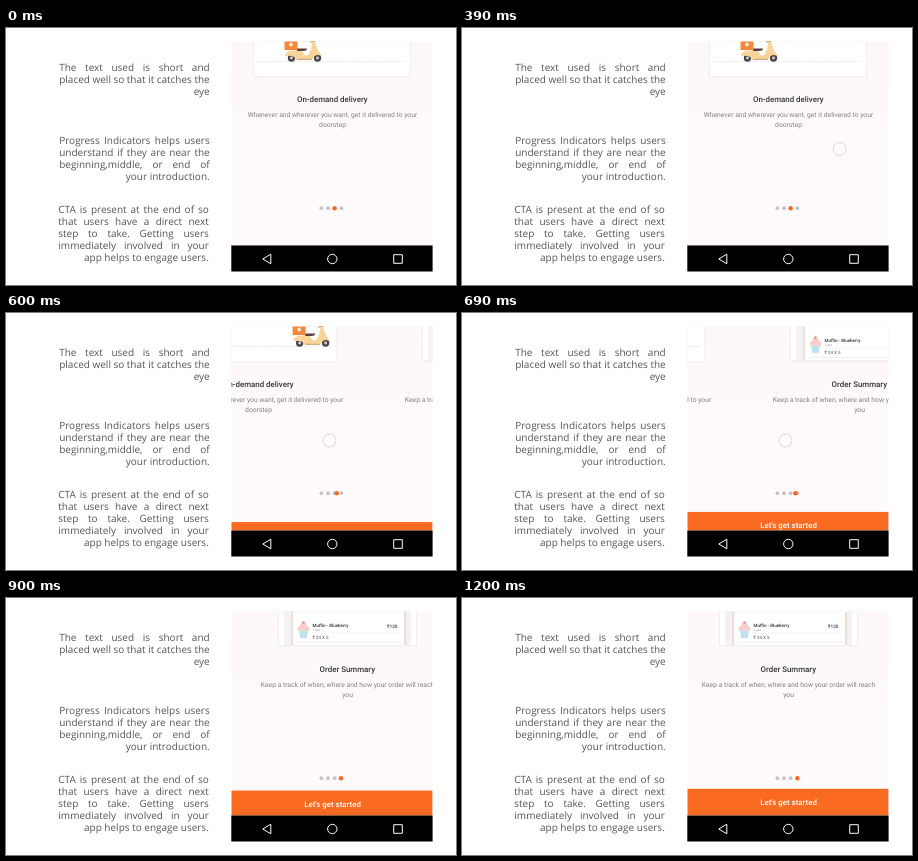
An HTML page with a canvas for the animation above (1560 ms loop, 450 by 257 pixels).

```html
<!DOCTYPE html>
<html lang="en">
<meta charset="utf-8">
<title>Onboarding swipe</title>
<style>
html, body { margin: 0; overflow: hidden; background: #fff; }
canvas { display: block; }
</style>
<canvas id="stage" width="450" height="257"></canvas>
<script>
const ctx = document.getElementById('stage').getContext('2d');
ctx.textRendering = 'geometricPrecision';

const LOOP = 1560, STEP = 30, SPACING = 233;
const ORANGE = '#fb6a21';
const SCREEN = { left: 225.3, top: 13.4, right: 426.6, nav: 217.5, bottom: 243.5 };
SCREEN.width = SCREEN.right - SCREEN.left;

// [ms, value] keys, linear in between
const SCROLL = [[450, 0], [510, 14], [570, 46], [600, 74], [630, 106], [660, 138], [690, 162],
  [720, 171], [810, 194], [900, 218], [990, 231], [1080, 232.3], [1200, SPACING]];
const TOUCH = [[420, 0], [510, 0.35], [600, 1]];
const TOUCH_ALPHA = [[270, 0], [360, 1], [690, 1], [810, 0.5], [900, 0]];

const NOTES = [
  { x: 53.2, y: 43, lines: ['The text used is short and', 'placed well so that it catches the', 'eye'] },
  { x: 53.2, y: 115.5, lines: ['Progress Indicators helps users', 'understand if they are near the',
    'beginning,middle, or end of', 'your introduction.'] },
  { x: 52.3, y: 184.5, lines: ['CTA is present at the end of so', 'that users have a direct next',
    'step to take. Getting users', 'immediately involved in your', 'app helps to engage users.'] }
];

function keyed(keys, t) {
  if (t <= keys[0][0]) return keys[0][1];
  for (let i = 1; i < keys.length; i++) {
    const [t0, v0] = keys[i - 1], [t1, v1] = keys[i];
    if (t <= t1) return v0 + (v1 - v0) * (t - t0) / (t1 - t0);
  }
  return keys[keys.length - 1][1];
}

function rect(x, y, w, h, color) {
  ctx.fillStyle = color;
  ctx.fillRect(x, y, w, h);
}

function disc(x, y, r, color) {
  ctx.fillStyle = color;
  ctx.beginPath();
  ctx.arc(x, y, r, 0, 7);
  ctx.fill();
}

function shape(path, color) {
  ctx.fillStyle = color;
  ctx.fill(new Path2D(path));
}

function line(path, color, width = 0.7) {
  ctx.strokeStyle = color;
  ctx.lineWidth = width;
  ctx.stroke(new Path2D(path));
}

function text(str, x, y, font, color, align = 'left') {
  ctx.font = font;
  ctx.fillStyle = color;
  ctx.textAlign = align;
  ctx.fillText(str, x, y);
}

const roboto = (size, weight = 400) => `${weight} ${size}px Roboto, sans-serif`;

function at(dx, draw) {
  ctx.save();
  ctx.translate(dx, 0);
  draw();
  ctx.restore();
}

function clipped(x, y, w, h, draw) {
  ctx.save();
  ctx.beginPath();
  ctx.rect(x, y, w, h);
  ctx.clip();
  draw();
  ctx.restore();
}

function note({ x, y, lines }) {
  const font = '10px "Open Sans", sans-serif', color = '#555', width = 150.5;
  lines.forEach((str, i) => {
    const base = y + i * 12;
    if (i === lines.length - 1) return text(str, x + width, base, font, color, 'right');
    ctx.font = font;
    const words = str.split(' ');
    const sizes = words.map(w => ctx.measureText(w).width);
    const gap = (width - sizes.reduce((a, b) => a + b)) / (words.length - 1);
    let left = x;
    words.forEach((w, k) => {
      text(w, left, base, font, color);
      left += sizes[k] + gap;
    });
  });
}

function card(x, w, bottom) {
  rect(x - 0.6, 0, w + 1.2, bottom + 0.8, '#e8e4e8');
  rect(x, 0, w, bottom, '#fff');
}

function caption(title, line1, line2) {
  text(title, 326.3, 73.7, roboto(7.9, 500), '#333', 'center');
  text(line1, 326.5, 89.3, roboto(6.75), '#808080', 'center');
  text(line2, 326.5, 98.9, roboto(6.75), '#808080', 'center');
}

function scooter() {
  disc(285.5, 30, 3.7, '#4a4548');
  disc(311.5, 30, 3.7, '#4a4548');
  shape('M279 28Q280 22.5 287 22.5H296Q297 27.5 301 27.5Q305 26 306.5 13H309Q310 21 316 28L312 27Q308 27 306 31.5H290Q289 27 279 28Z', '#f8d49a');
  shape('M291 20.5H301Q301 23 297 23H291Z', '#5a4038');
  rect(278.5, 8, 13, 14, '#f5873a');
  disc(285, 16.5, 2, '#fde6d2');
  line('M304 14L309 13', '#8a5a3c', 1);
  line('M291 31.3H306', '#b98a5a', 0.8);
  disc(285.5, 30, 1.4, '#d8d4d4');
  disc(311.5, 30, 1.4, '#d8d4d4');
}

function deliveryPage(offset) {
  at(-offset, () => {
    card(247.5, 157, 48.5);
    clipped(247.5, 0, 157, 48, () => {
      ctx.setLineDash([2, 1.5]);
      line('M253 33.5H399', '#ddd6d4', 0.6);
      ctx.setLineDash([]);
      at(offset * 1.11, scooter);
    });
    caption('On-demand delivery',
      'Whenever and wherever you want, get it delivered to your', 'doorstep');
  });
}

function summaryPage(offset) {
  at(SPACING - offset, () => {
    card(258, 137, 47.5);
    rect(263, 0, 127, 47, '#f4f1f4');
    rect(270, 0, 115, 47, '#fff');
    rect(270, 0, 2.2, 47, '#f0dfd4');
    rect(383, 0, 2.2, 47, '#f0dfd4');
    line('M276 44.5H380', '#e8e5e8', 0.6);
    line('M291 35H379', '#eee', 0.6);
    shape('M278 32.5H287L285.7 40H279.3Z', '#bfe0ee');
    shape('M276.8 32.5Q276 29 279 28Q280 24 282.5 24Q285 24 286 28Q289 29 288.2 32.5Z', '#f6cdc8');
    disc(282.5, 24.5, 1.2, '#e58a86');
    text('Muffin - Blueberry', 291.5, 28.6, roboto(4.5, 500), '#333');
    text('1 unit', 291.5, 33, roboto(3), '#888');
    text('₹ 24 X 5', 291.5, 40.6, roboto(4.5), '#555');
    text('₹120', 366, 29.6, roboto(4.7, 500), '#444');
    caption('Order Summary',
      'Keep a track of when, where and how your order will reach', 'you');
  });
}

function navBar() {
  const { left, nav, width, bottom } = SCREEN;
  rect(left, nav, width, bottom - nav, '#000');
  line('M264.8 226.2V235.8L256.8 231Z', '#fff', 1);
  line('M321.6 231a4.7 4.7 0 1 0 9.4 0a4.7 4.7 0 1 0 -9.4 0', '#fff', 1);
  line('M387.7 226.7H396.3V235.3H387.7Z', '#fff', 1);
}

function touchRing(t) {
  const k = keyed(TOUCH, t);
  ctx.save();
  ctx.globalAlpha = keyed(TOUCH_ALPHA, t);
  disc(377.7 - 54.2 * k, 121 + 6.5 * k, 6.5, 'rgba(255,255,255,.6)');
  ctx.strokeStyle = '#ccc8cc';
  ctx.lineWidth = 0.7;
  ctx.stroke();
  ctx.restore();
}

function phone(t) {
  const { left, top, nav, width } = SCREEN;
  const offset = keyed(SCROLL, t), progress = offset / SPACING;

  clipped(left, top, width, nav - top, () => {
    const back = ctx.createLinearGradient(0, top, 0, nav);
    back.addColorStop(0, '#fdf7fb');
    back.addColorStop(0.45, '#fef9fc');
    back.addColorStop(1, '#fefafb');
    rect(left, top, width, nav - top, back);

    deliveryPage(offset);
    summaryPage(offset);

    for (const x of [315.4, 322, 328.6, 335.4]) disc(x, 180.2, 1.9, '#c6c2c6');
    disc(328.6 + 6.8 * progress, 180.2, 2.2, ORANGE);

    const rise = 26.7 * (1 - progress);
    rect(left, 190.8 + rise, width, 27, ORANGE);
    text("Let's get started", 326.5, 206.8 + rise, roboto(7.9, 500), '#fff', 'center');
    touchRing(t);
  });
  navBar();
}

function render(now) {
  const t = Math.floor(now % LOOP / STEP) * STEP;
  rect(0, 0, 450, 257, '#fff');
  NOTES.forEach(note);
  phone(t);
  requestAnimationFrame(render);
}
render(performance.now());
</script>
</html>
```
